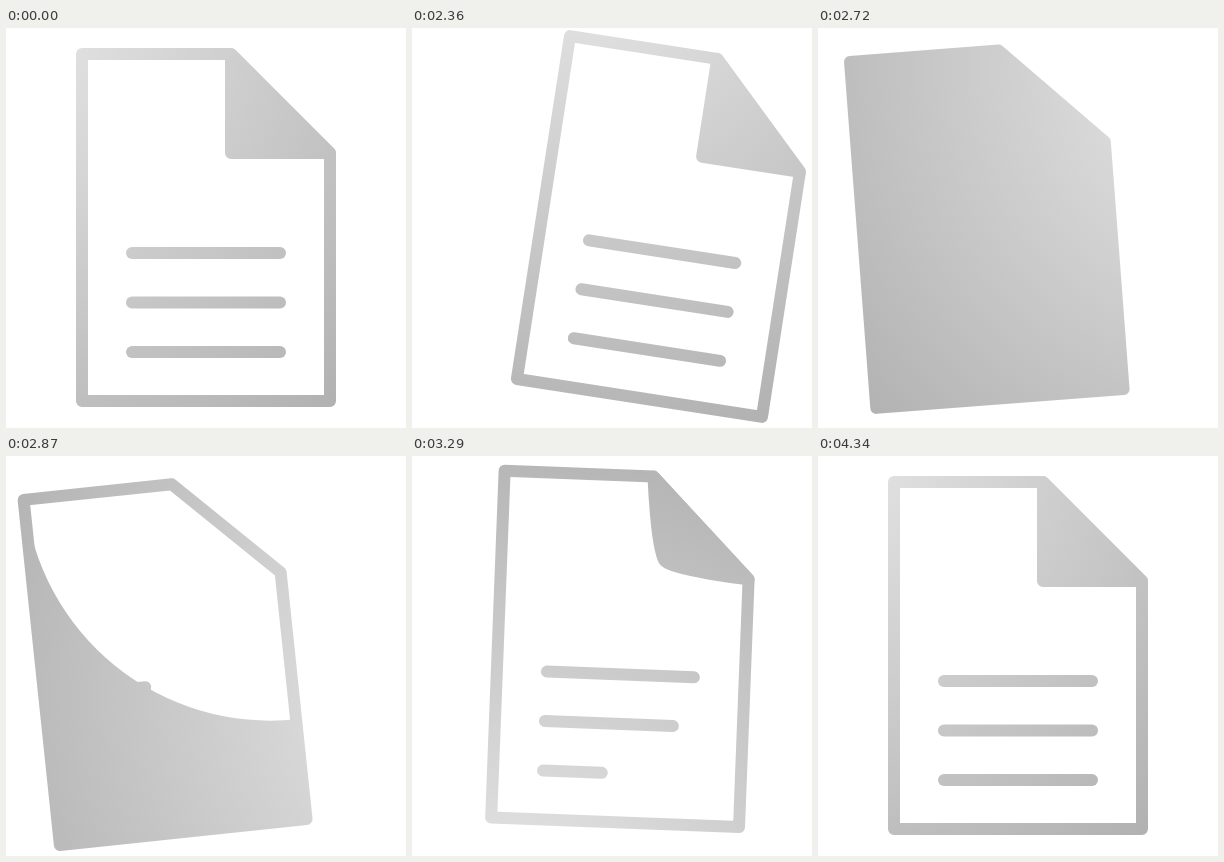
These frames come from a looping animation (400x400 px, 4430 ms). An HTML page with a canvas:

```html
<!DOCTYPE html>
<html lang="en">
<head>
<meta charset="utf-8">
<title>Page turn</title>
<style>
html, body { margin: 0; width: 100%; height: 100%; overflow: hidden; background: #fff; }
canvas { display: block; width: 100vw; height: 100vh; }
</style>
</head>
<body>
<canvas width="400" height="400"></canvas>
<script>
const ctx = document.querySelector('canvas').getContext('2d');
const LOOP = 4430;

// time, x shift, y shift, tilt in degrees
const sway = [
  [2000, 0, 0, 0], [2360, 54, -1, 8.8], [2540, 20.5, -1, 6.5],
  [2720, -31, -2, -4.3], [2860, -41, 4, -6], [3080, -19.5, 2.2, -4.3],
  [3400, 17, -9, 4], [3560, 7.5, -4.5, 2.9], [3800, 0, 0, 0]
];
// time, turn of the light in degrees
const light = [[2000, 0], [2360, 30], [2720, 104], [3080, 197], [3560, 305], [3800, 360]];

const clamp = v => Math.min(1, Math.max(0, v));
const part = (t, from, to) => clamp((t - from) / (to - from));
const easeOut = (u, power) => 1 - (1 - u) ** power;

// Smooth curve through the keys, flat at turning points and at both ends
function curve(keys, t, c) {
  const last = keys.length - 1;
  if (t <= keys[0][0]) return keys[0][c];
  if (t >= keys[last][0]) return keys[last][c];
  const slope = i => {
    if (i === 0 || i === last) return 0;
    const [a, b, d] = [keys[i - 1], keys[i], keys[i + 1]];
    return (b[c] - a[c]) * (d[c] - b[c]) <= 0 ? 0 : (d[c] - a[c]) / (d[0] - a[0]);
  };
  const i = keys.findIndex(k => k[0] > t) - 1;
  const [a, b] = [keys[i], keys[i + 1]];
  const span = b[0] - a[0], s = (t - a[0]) / span, r = 1 - s;
  return a[c] * (1 + 2 * s) * r * r + b[c] * (3 - 2 * s) * s * s
    + span * (slope(i) * s * r * r - slope(i + 1) * s * s * r);
}

function pagePath() {
  ctx.beginPath();
  ctx.moveTo(76, 26);
  ctx.lineTo(225, 26);
  ctx.lineTo(324, 125);
  ctx.lineTo(324, 373);
  ctx.lineTo(76, 373);
  ctx.closePath();
}

function drawLine(y, amount) {
  if (amount <= 0) return;
  ctx.beginPath();
  ctx.moveTo(126, y);
  ctx.lineTo(126 + 148 * amount, y);
  ctx.stroke();
}

// The corner swells from the diagonal into a sharp triangle
function drawFold(amount) {
  if (amount <= 0) return;
  const x = 274.5 - 49.5 * amount, y = 75.5 + 49.5 * amount, h = 30 * (1 - amount);
  ctx.beginPath();
  ctx.moveTo(225, 26);
  ctx.bezierCurveTo(225, 26, x - h, y - h, x, y);
  ctx.bezierCurveTo(x + h, y + h, 324, 125, 324, 125);
  ctx.closePath();
  ctx.fill();
  ctx.stroke();
}

// The back of the sheet sweeps over the page from the cut corner
function drawSheet(t) {
  if (t < 2400 || t > 3000) return;
  const outer = 70 + 365 * part(t, 2400, 2690);
  const inner = 70 + 365 * part(t, 2750, 3000);
  ctx.save();
  pagePath();
  ctx.clip();
  ctx.beginPath();
  ctx.arc(324, 26, outer, 0, 7);
  if (t > 2750) ctx.arc(324, 26, inner, 0, 7);
  ctx.fill('evenodd');
  ctx.restore();
}

function draw(t) {
  const tilt = curve(sway, t, 3);
  ctx.clearRect(0, 0, 400, 400);
  ctx.save();
  ctx.translate(200 + curve(sway, t, 1), 199.5 + curve(sway, t, 2));
  ctx.rotate(tilt * Math.PI / 180);
  ctx.translate(-200, -199.5);

  const angle = (curve(light, t, 1) - 135 - tilt) * Math.PI / 180;
  const gx = 200 + 300 * Math.cos(angle), gy = 199.5 + 300 * Math.sin(angle);
  const grey = ctx.createRadialGradient(gx, gy, 80, gx, gy, 510);
  grey.addColorStop(0, '#e0e0e0');
  grey.addColorStop(1, '#b2b2b2');
  ctx.fillStyle = ctx.strokeStyle = grey;
  ctx.lineWidth = 12;
  ctx.lineCap = ctx.lineJoin = 'round';

  pagePath();
  ctx.stroke();
  const fresh = t > 2720;
  for (let i = 0; i < 3; i++) {
    const start = 2790 + 203 * i;
    drawLine(225 + 49.5 * i, fresh ? easeOut(part(t, start, start + 612), 3) : 1);
  }
  drawFold(fresh ? easeOut(part(t, 2913, 3746), 2) : 1);
  drawSheet(t);
  ctx.restore();
}

const begin = performance.now();
function tick() {
  draw((performance.now() - begin) % LOOP);
  requestAnimationFrame(tick);
}
tick();
</script>
</body>
</html>
```
